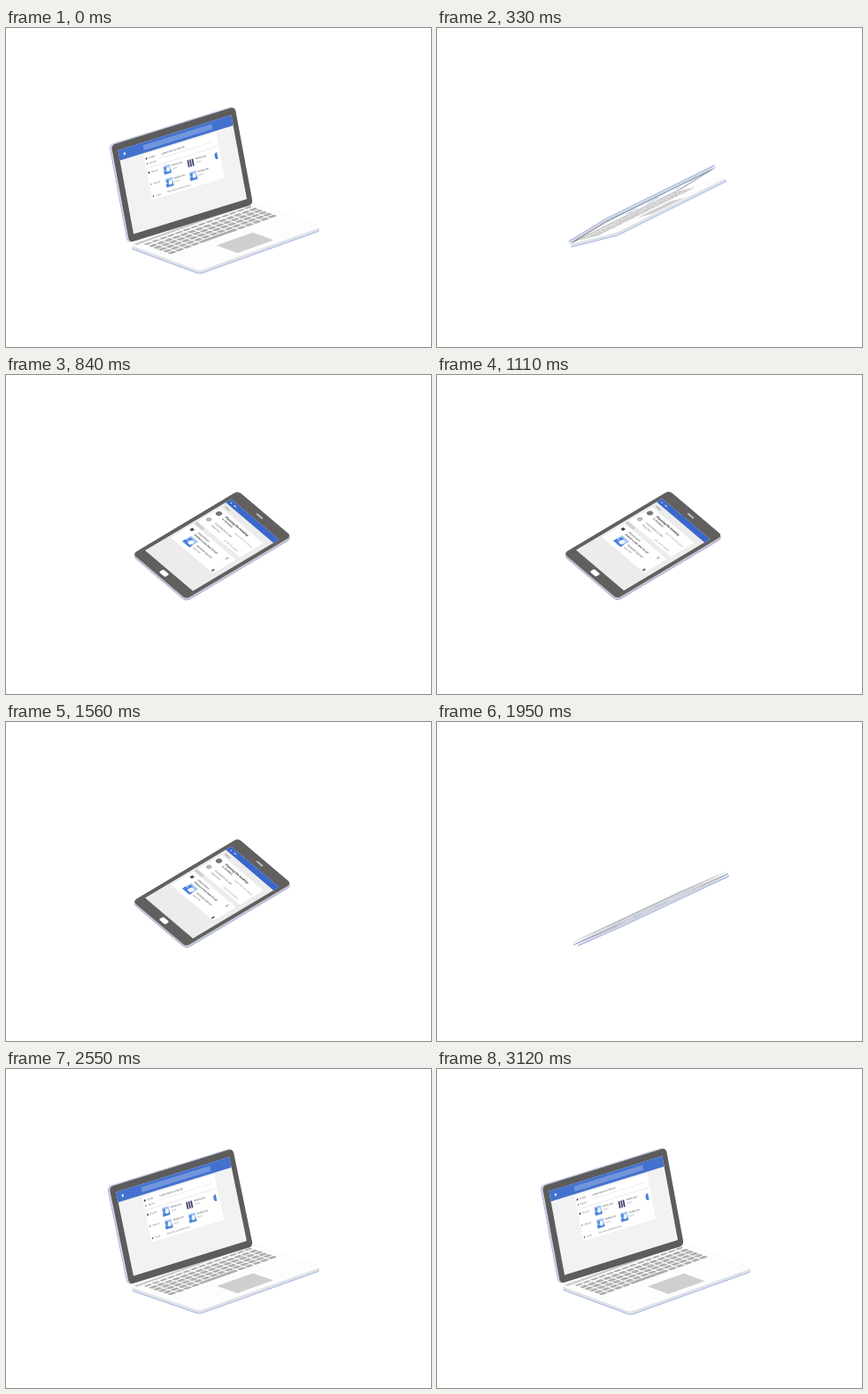
Animation, 480 px wide and 360 px high, one loop 3150 ms. Source, as an HTML page:

```html
<!DOCTYPE html>
<html lang="en">
<head>
<meta charset="utf-8">
<title>Laptop and tablet</title>
<style>
  html, body { margin: 0; width: 100%; height: 100%; overflow: hidden; background: #fff; }
  svg { display: block; width: 100vw; height: 100vh; }
  text { font-family: Roboto, Arial, sans-serif; }
</style>
</head>
<body>
<svg id="stage" viewBox="0 0 480 360"></svg>
<script>
const LOOP = 3150;
const LAYERS = 6;
const LAPTOP = { w: 178, d: 123, lid: 114 };
const TABLET = { w: 153, d: 96 };

// Screen projections of the right, front and up axes.
const LAPTOP_AXES = [[0.773, -0.27], [0.633, 0.235], [-0.054, -0.937]];
const TABLET_AXES = [[0.778, -0.464], [0.628, 0.533], [-0.037, -0.707]];

// Change of the long axis per unit of downward reach, standing in for perspective.
const CONVERGENCE = [-0.012, -0.028];

const stage = document.getElementById('stage');

const rect = (x, y, w, h, fill, r = 0) =>
  `<rect x="${x}" y="${y}" width="${w}" height="${h}" rx="${r}" fill="${fill}"/>`;
const dot = (x, y, r, fill) => `<circle cx="${x}" cy="${y}" r="${r}" fill="${fill}"/>`;
const label = (x, y, size, text, fill = '#777', weight = 400) =>
  `<text x="${x}" y="${y}" font-size="${size}" font-weight="${weight}" fill="${fill}">${text}</text>`;

function thumb(x, y, w, h) {
  return rect(x, y, w, h, '#a9c8f2') +
    rect(x, y + h * 0.62, w, h * 0.38, '#4a82d8') +
    dot(x + w * 0.3, y + h * 0.35, w * 0.2, '#4a82d8') +
    rect(x + w * 0.42, y + h * 0.3, w * 0.42, h * 0.48, '#f4f8ff');
}

function baseFace() {
  let s = rect(0, 0, LAPTOP.w, LAPTOP.d, '#fdfdfd', 5) + rect(5, 0, 168, 5, '#c9c9cb');
  for (let row = 0; row < 6; row++) {
    const y = 9 + row * 8.4;
    for (let col = 0; col < 14; col++) {
      if (row === 5 && col > 3 && col < 9) continue;
      s += rect(12 + col * 11.3, y, 9.2, row ? 6.2 : 4.5, '#acacac', 0.8);
    }
  }
  return s + rect(57.2, 51, 54, 6.2, '#acacac', 0.8) + rect(64, 76, 53, 37, '#cfcfcf', 1);
}

function lidFace() {
  let s = rect(0, 0, LAPTOP.w, LAPTOP.lid, '#5c5c5d', 5) +
    rect(8, 8, 163, 98, '#f2f2f3') +
    rect(8, 8, 163, 12, '#4371ce') +
    rect(43, 11, 99, 6, '#7295dc', 0.8) +
    dot(16, 14, 1.5, '#e8effc') +
    rect(42, 22, 104, 15, '#fff') + rect(42, 39, 104, 36, '#fff');
  s += dot(44.5, 27, 1.2, '#444') + label(48, 28, 3.2, 'Folder', '#666') +
    label(66, 28, 3.4, 'Latest items in the list', '#555') +
    dot(44.5, 33, 1, '#888') + label(48, 34, 3, 'Recent') +
    rect(62, 31, 78, 0.5, '#ddd');
  s += dot(44.5, 43.5, 1.2, '#444') + label(48, 44.5, 3, 'Shared') +
    dot(44.5, 57, 1, '#888') + label(48, 58, 3, 'Starred') +
    label(48, 72, 3, 'Trash') + dot(44.5, 71, 1, '#555');
  s += thumb(65, 41, 10, 10) + thumb(65, 56, 10, 10) + thumb(99, 57, 10, 10);
  s += rect(99, 42, 10, 10, '#eef0f6');
  for (let i = 0; i < 3; i++) s += rect(99.5 + i * 3.2, 43, 2, 8, i === 1 ? '#5a4262' : '#2d3f75');
  for (const [x, y] of [[77, 44], [111, 45], [77, 59], [111, 60]])
    s += label(x, y, 3, 'Weekly plan', '#555') + label(x, y + 4, 2.6, 'Edited', '#999');
  return s + label(65, 72, 2.8, 'More files and folders here', '#777') +
    '<path d="M142 44a4 4 0 0 0 0 8z" fill="#4a82d8"/>';
}

function tabletFace() {
  let s = rect(5, 14, 86, 125, '#ececed') +
    rect(5, 14, 86, 8, '#3a68ca') +
    rect(42, 6, 11, 2, '#c9c9c9', 1) +
    rect(42, 142.5, 11, 6.5, '#fff', 2) +
    dot(10, 18, 0.9, '#dce7fb') + rect(15, 17.4, 4, 1.2, '#dce7fb');
  s += label(10, 28, 3.6, 'Inbox', '#666') +
    rect(8, 31, 76, 34, '#fff') + rect(8, 71, 76, 33, '#fff');
  s += dot(14, 39, 3.6, '#777') +
    label(23, 38, 4.2, 'Planning the meeting', '#333', 700) +
    label(23, 42.5, 3.4, 'to members', '#555', 700) +
    label(50, 46, 3.4, 'about the new plans', '#999') +
    dot(14, 53.5, 3.3, '#b9b9b9') + label(23, 53, 3.8, 'Comments to see', '#666') +
    label(23, 58, 3.3, 'Reply here') + label(50, 62, 3.3, 'see all the replies', '#999');
  s += rect(8, 66, 14, 4, '#d0d0d2') +
    rect(12, 76, 4, 4, '#444') + label(22, 77, 3.8, 'Attachment', '#444') +
    label(22, 82, 3.6, 'Shared a new item for all', '#444', 700) +
    thumb(21, 85, 13, 13) + label(37, 91, 3.8, 'Summer trip list', '#444') +
    label(37, 96, 3.2, 'Open file') +
    rect(75, 75, 1.5, 4, '#999') + rect(79, 99, 2, 4, '#555');
  return rect(0, 0, TABLET.w, TABLET.d, '#625f5f', 5.5) +
    `<g transform="matrix(0 1 -1 0 ${TABLET.w} 0)">${s}</g>`;
}

function makeSlab(w, h, r, thickness, side, front, backFill) {
  const root = document.createElementNS('http://www.w3.org/2000/svg', 'g');
  const shell = rect(0, 0, w, h, side, r);
  const back = rect(0, 0, w, h, backFill, r);
  root.innerHTML = `<g>${shell}</g>`.repeat(LAYERS) + `<g>${front}</g><g>${back}</g>`;
  root.children[0].firstChild.setAttribute('style',
    'stroke:#7f97d6;stroke-width:.7;vector-effect:non-scaling-stroke');
  stage.append(root);
  const parts = [...root.children];
  return { root, layers: parts.slice(0, LAYERS), front: parts[LAYERS], back: parts[LAYERS + 1], thickness };
}

const base = makeSlab(LAPTOP.w, LAPTOP.d, 5, 3.8, '#dde1e7', baseFace(), '#bcbcbc');
const lid = makeSlab(LAPTOP.w, LAPTOP.lid, 5, 3.2, '#d3d7e3', lidFace(), '#b0b0b0');
const tablet = makeSlab(TABLET.w, TABLET.d, 5.5, 3.6, '#c6c9d2', tabletFace(), '#b0b0b0');

const add = (p, q, k = 1) => [p[0] + q[0] * k, p[1] + q[1] * k];
const scale = (p, k) => [p[0] * k, p[1] * k];
const mix = (p, q, k) => add(scale(p, 1 - k), q, k);
const smooth = u => u * u * (3 - 2 * u);

// Eased value at t through [time, value] keys.
function track(t, keys) {
  if (t <= keys[0][0]) return keys[0][1];
  for (let i = 1; i < keys.length; i++) {
    const [t0, v0] = keys[i - 1], [t1, v1] = keys[i];
    if (t <= t1) return v0 + (v1 - v0) * smooth((t - t0) / (t1 - t0));
  }
  return keys[keys.length - 1][1];
}

function placeSlab(slab, origin, u, v, normal, size) {
  const frontShown = u[0] * v[1] - u[1] * v[0] > 0;
  const put = (el, depth) => {
    const o = add(origin, normal, depth * slab.thickness * size);
    el.setAttribute('transform', `matrix(${[...u, ...v, ...o].map(n => n.toFixed(4)).join(' ')})`);
  };
  slab.layers.forEach((el, i) => {
    const k = i / (LAYERS - 1);
    put(el, frontShown ? 1 - k : k);
  });
  put(slab.front, 0);
  put(slab.back, 1);
  slab.front.style.display = frontShown ? '' : 'none';
  slab.back.style.display = frontShown ? 'none' : '';
}

function render(t) {
  const morph = track(t, [[180, 0], [440, 1], [1800, 1], [1950, 0.45], [2260, 0]]);
  const shrink = track(t, [[180, 0], [440, 1], [1800, 1], [2140, 0]]);
  const [a, b, c] = LAPTOP_AXES.map((axis, i) => mix(axis, TABLET_AXES[i], morph));
  const dir = deg => {
    const r = deg * Math.PI / 180;
    return add(scale(b, Math.cos(r)), c, Math.sin(r));
  };
  const bob = 0.45 * (1 + Math.cos(2 * Math.PI * (t - 600) / 980)) * morph;
  const center = [
    track(t, [[150, 248], [450, 232.7], [1800, 232.7], [2100, 250], [2480, 248]]),
    track(t, [[150, 235], [450, 191.4], [1800, 191.4], [2100, 231], [2480, 235]]) + bob
  ];

  // The two devices swap while they are seen edge-on.
  const showTablet = t >= 400 && t < 1950;
  tablet.root.style.display = showTablet ? '' : 'none';
  base.root.style.display = lid.root.style.display = showTablet ? 'none' : '';

  if (showTablet) {
    const tilt = track(t, [[400, -132], [615, 0], [1750, 0], [1950, 38]]);
    const size = 1 + 0.16 * (1 - shrink);
    const u = scale(a, size), v = scale(dir(tilt), size);
    const corner = add(add(center, u, -TABLET.w / 2), v, -TABLET.d / 2);
    placeSlab(tablet, corner, u, v, dir(tilt - 90), size);
    return;
  }

  const tilt = t < 400
    ? track(t, [[0, 0], [150, -18], [400, 48]])
    : track(t, [[2130, 217], [2510, 361.2], [2590, 361], [2850, 360]]);
  const opening = t < 400
    ? track(t, [[110, 101.5], [380, 0]])
    : track(t, [[1950, 0], [2250, 101.5], [2500, 102.5], [2600, 102.3], [2850, 101.5]]);
  const size = 1 - 0.16 * shrink;
  const reach = scale(dir(tilt), size), rise = scale(dir(tilt + opening), size);
  const across = along => add(scale(a, size), CONVERGENCE, along[1]);
  const hinge = add(center, reach, -LAPTOP.d / 2);
  const corner = (middle, u) => add(middle, u, -LAPTOP.w / 2);

  const baseU = across(reach), lidU = across(rise);
  placeSlab(base, corner(hinge, baseU), baseU, reach, dir(tilt - 90), size);
  placeSlab(lid, corner(add(hinge, rise, LAPTOP.lid), lidU), lidU, scale(rise, -1),
    dir(tilt + opening + 90), size);
}

const start = performance.now();
function tick() {
  render((performance.now() - start) % LOOP);
  requestAnimationFrame(tick);
}
tick();
</script>
</body>
</html>
```
